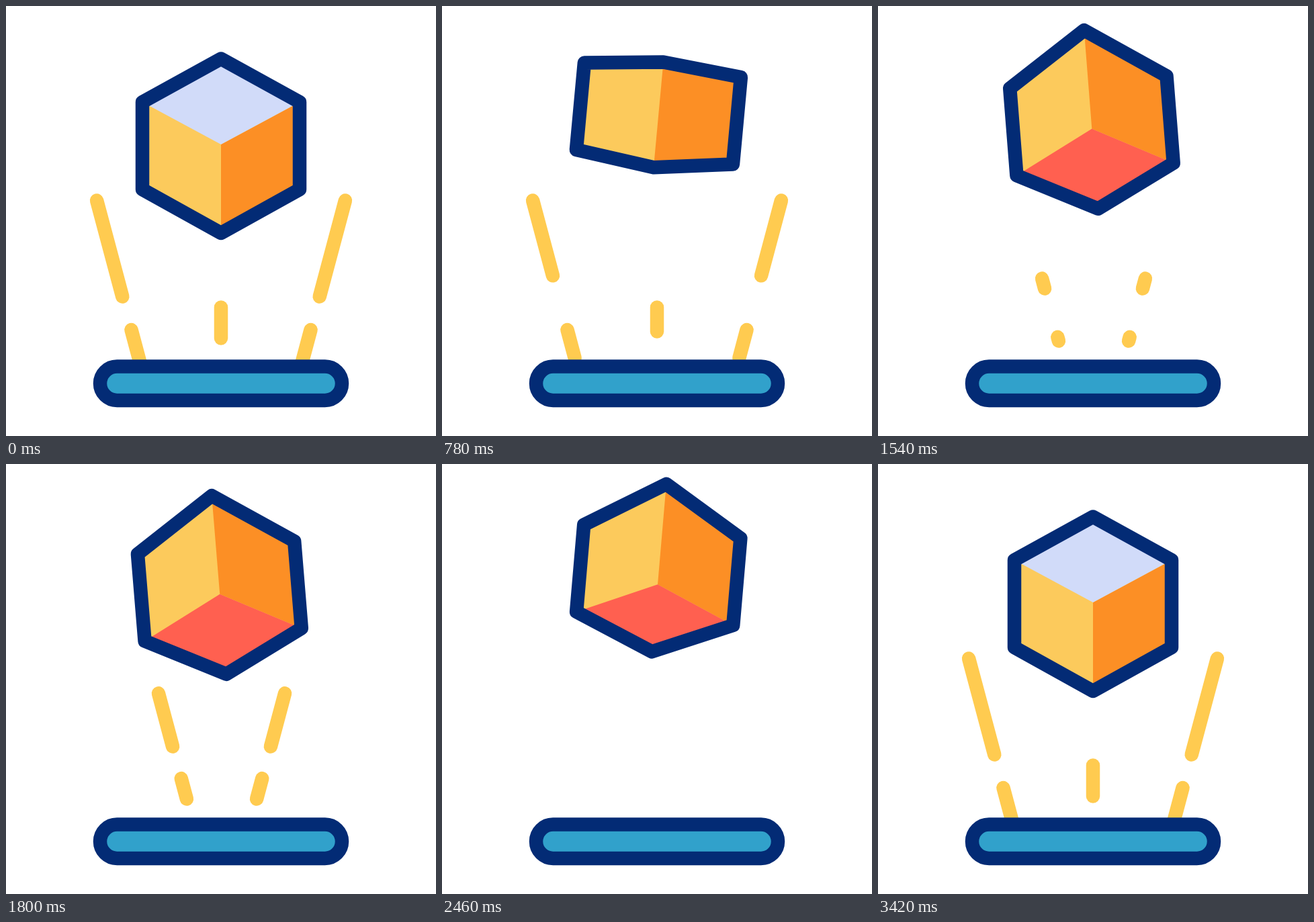
Write an HTML page with a canvas that moves like this. It is 640 px wide and 640 px high and loops after 3600 ms.

```html
<!DOCTYPE html>
<html>
<head>
<meta charset="utf-8">
<style>
html, body { margin: 0; width: 100%; height: 100%; overflow: hidden; background: #fff; }
canvas { display: block; }
</style>
</head>
<body>
<canvas id="stage" width="640" height="640"></canvas>
<script>
const ctx = document.getElementById('stage').getContext('2d');
const LOOP = 3600;
const NAVY = '#032b75', GOLD = '#ffcb50';
const RAY_SLOPE = 0.267;
const HALF_WIDTH = 117, HALF_HEIGHT = 65;

const lerp = (a, b, k) => a + (b - a) * k;

function ease(t, from, to) {
  const u = Math.min(1, Math.max(0, (t - from) / (to - from)));
  return u * u * (3 - 2 * u);
}

// Height of the cube's centre on the stage.
const lift = t => 208 - 57.5 * ease(t, 150, 1000) + 39 * ease(t, 1000, 1840)
  - 39.5 * ease(t, 2000, 2800) + 58 * ease(t, 2800, 3420);

// Sideways rocking in degrees.
const tilt = t => 5.3 * ease(t, 100, 800) - 10 * ease(t, 900, 1600)
  + 9.7 * ease(t, 1820, 2500) - 5 * ease(t, 2700, 3420);

// 0 shows the cube from above, 1 from below.
const pitch = t => (ease(t, 100, 800) + ease(t, 800, 1500)
  - ease(t, 2320, 3010) - ease(t, 3010, 3420)) / 2;

function trace(points) {
  ctx.beginPath();
  for (const [x, y] of points) ctx.lineTo(x, y);
}

function polygon(points, fill) {
  trace(points);
  ctx.closePath();
  ctx.fillStyle = fill;
  ctx.fill();
}

// Strokes the part of a dash between two fractions of its length.
function dash(x0, slope, base, tip, tail, head) {
  if (head <= tail) return;
  trace([tail, head].map(k => {
    const y = lerp(base, tip, k);
    return [x0 + slope * y, y];
  }));
  ctx.stroke();
}

function dashPair(x0, axis, base, tip, tail, head) {
  dash(x0, RAY_SLOPE, base, tip, tail, head);
  dash(2 * axis - x0, -RAY_SLOPE, base, tip, tail, head);
}

function drawRays(t) {
  ctx.strokeStyle = GOLD;
  const leaving = t < 1200;
  let tail = leaving ? ease(t, 600, 1200) : 0;
  let head = leaving ? 1 : ease(t, 2600, 3200);
  dashPair(57.8, 320, 432.5, 289.5, tail, head);
  dashPair(57.8, 320, 535.5, 482, tail, head);
  dash(320, 0, 494.5, 448.5, tail, head);

  tail = ease(t, 1800, 2400);
  head = ease(t, 1400, 2000);
  dashPair(135.8, 321, 420.5, 314, tail, head);
  dashPair(135.8, 321, 498.5, 457.5, tail, head);
}

function drawPlate() {
  ctx.beginPath();
  ctx.roundRect(140, 536.5, 360, 50.5, 25.25);
  ctx.fillStyle = '#31a1cb';
  ctx.fill();
  ctx.strokeStyle = NAVY;
  ctx.stroke();
}

function drawCube(t) {
  const angle = tilt(t) * Math.PI / 180;
  const p = pitch(t), bulge = p * (1 - p);

  // The near vertical edge slides up and grows while it faces the viewer.
  const middle = 64 - 133 * p + 17 * bulge;
  const half = 66 + 7.5 * p + 36 * bulge;
  const upper = middle - half, lower = middle + half;
  const backTop = -2 * HALF_HEIGHT - 1.5 - upper;
  const backBottom = 2 * HALF_HEIGHT - 1.5 - lower;

  const topLeft = [-HALF_WIDTH, -HALF_HEIGHT], topRight = [HALF_WIDTH, -HALF_HEIGHT];
  const bottomLeft = [-HALF_WIDTH, HALF_HEIGHT], bottomRight = [HALF_WIDTH, HALF_HEIGHT];
  const frontTop = [0, upper], frontBottom = [0, lower];
  const peak = [0, Math.min(upper, backTop)], foot = [0, Math.max(lower, backBottom)];
  const outline = [topLeft, peak, topRight, bottomRight, foot, bottomLeft];

  ctx.save();
  ctx.translate(320 + 26 * Math.sin(angle), lift(t));
  ctx.rotate(angle);
  polygon(outline, '#fcca5c');
  polygon([frontTop, topRight, bottomRight, frontBottom], '#fc8f25');
  if (backTop < upper) polygon([topLeft, peak, topRight, frontTop], '#d1dbf9');
  if (backBottom > lower) polygon([bottomLeft, frontBottom, bottomRight, foot], '#ff6050');
  trace(outline);
  ctx.closePath();
  ctx.strokeStyle = NAVY;
  ctx.stroke();
  ctx.restore();
}

function draw() {
  const t = performance.now() % LOOP;
  ctx.fillStyle = '#fff';
  ctx.fillRect(0, 0, 640, 640);
  ctx.lineWidth = 20.5;
  ctx.lineCap = ctx.lineJoin = 'round';
  drawRays(t);
  drawPlate();
  drawCube(t);
  requestAnimationFrame(draw);
}
draw();
</script>
</body>
</html>
```
